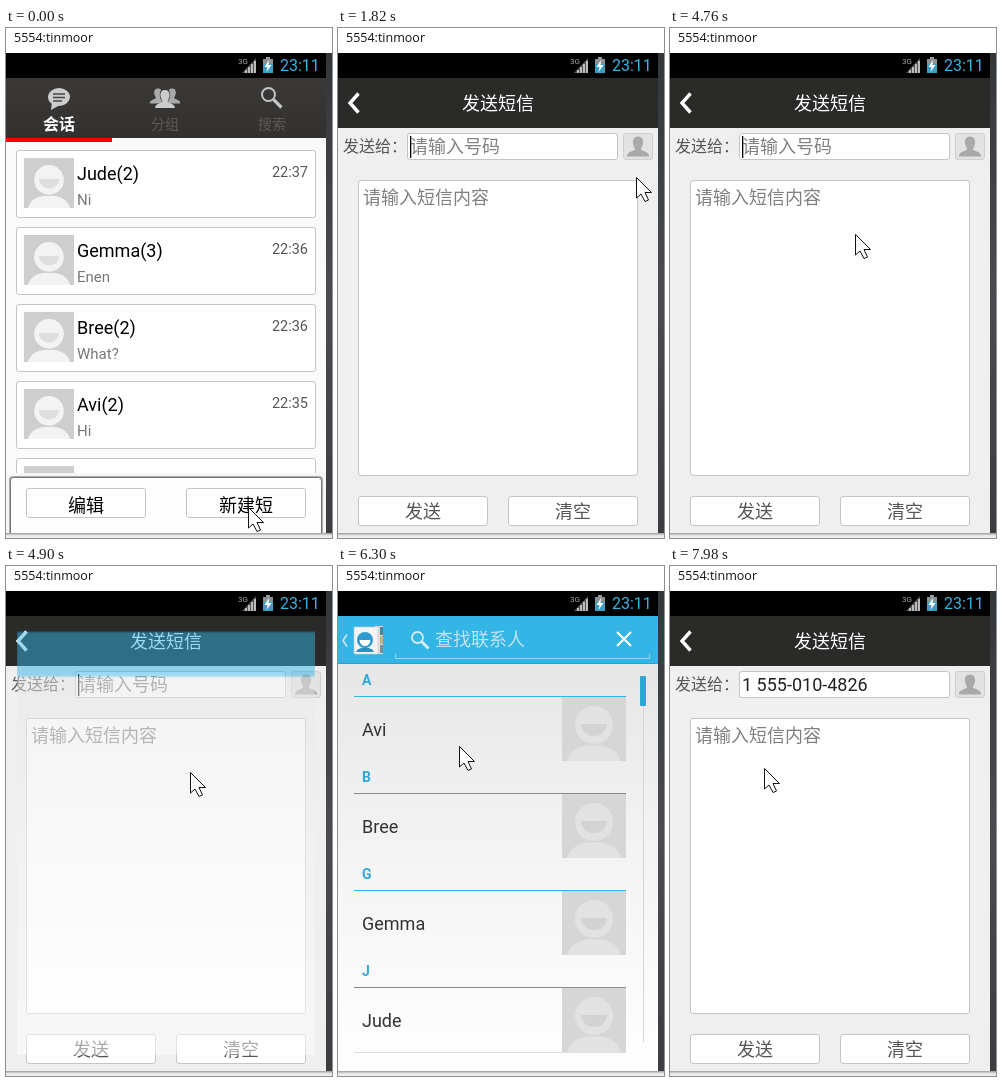
An HTML page for the animation above (8000 ms loop, 326 by 510 pixels).

```html
<!DOCTYPE html>
<html lang="zh-CN">
<head>
<meta charset="utf-8">
<title>短信</title>
<style>
html, body { margin: 0; width: 100%; height: 100%; overflow: hidden; background: #fff; }
svg { display: block; }
text { font-family: Roboto, "Noto Sans CJK SC", "Noto Sans CJK", sans-serif; white-space: pre; }
</style>
</head>
<body>
<svg id="stage" width="326" height="510" viewBox="0 0 326 510"></svg>
<script>
const STEP = 140, LOOP = 8000;

// Drawing helpers returning SVG markup
const rect = (x, y, w, h, fill, more = '') =>
  `<rect x="${x}" y="${y}" width="${w}" height="${h}" fill="${fill}" ${more}/>`;
const box = (x, y, w, h, fill = '#fff', stroke = '#c4c4c4') =>
  rect(x + .5, y + .5, w - 1, h - 1, fill, `rx="2.5" stroke="${stroke}"`);
const text = (s, x, y, size, fill, more = '') =>
  `<text x="${x}" y="${y}" font-size="${size}" fill="${fill}" ${more}>${s}</text>`;
const mid = 'text-anchor="middle"';
const path = (d, fill, more = '') => `<path d="${d}" fill="${fill}" ${more}/>`;
const line = (d, stroke, width = 1, more = '') =>
  path(d, 'none', `stroke="${stroke}" stroke-width="${width}" ${more}`);
const circle = (x, y, r, fill, more = '') =>
  `<circle cx="${x}" cy="${y}" r="${r}" fill="${fill}" ${more}/>`;
const group = (id, body, more = '') => `<g id="${id}" ${more}>${body}</g>`;

const avatar = (x, y, size, back, face, smile) =>
  `<g transform="translate(${x} ${y}) scale(${size / 64})">` +
  rect(0, 0, 64, 64, back) +
  path('M5 64C8 53 18 48 32 48S56 53 59 64Z', face) +
  circle(32, 28, 20.5, back) + circle(32, 28, 19, face) +
  path('M19 27H45C44 35 39 39 32 39S20 35 19 27Z', smile) + '</g>';

const magnifier = (x, y, r, color, width) =>
  circle(x, y, r, 'none', `stroke="${color}" stroke-width="${width}"`) +
  line(`M${x + r * .75} ${y + r * .75}L${x + r * 2} ${y + r * 2}`, color, width * 1.6);

const person = (x, y, k, color) =>
  `<g transform="translate(${x} ${y}) scale(${k})">` +
  path('M0-10C4-10 5.5-7 5-3C4.5 0 3 1 3 3C5 5 11 5 11 10H-11C-11 5-5 5-3 3C-3 1-4.5 0-5-3C-5.500-7-4-10 0-10Z', color) + '</g>';

function frameView() {
  return rect(0, 0, 326, 510, '#fff') +
    text('5554:tinmoor', 8, 13.500, 12.5, '#111', 'style="font-family:\'Open Sans\',sans-serif"') +
    rect(0, 505, 326, 5, 'url(#under)') +
    rect(320, 25, 6, 480, 'url(#side)') +
    rect(0, 25, 320, 480, '#000') +
    text('3G', 232, 36, 8, '#aaa') +
    path('M236 45L250 30V45Z', '#555') +
    [0, 1, 2, 3].map(i => rect(239 + i * 3, 42 - i * 3, 2, 3 + i * 3, '#bbb')).join('') +
    rect(260, 29, 4, 2, '#999') + rect(257, 31, 10, 14, '#8a9297') +
    rect(257, 36, 10, 9, '#3b9fc4') + path('M263 32L258.500 39H261.500L260.500 44L265.500 37H262.500Z', '#fff') +
    text('23:11', 274, 43, 16, '#33b5e5');
}

function listView() {
  const chats = [['Jude(2)', 'Ni', '22:37'], ['Gemma(3)', 'Enen', '22:36'],
    ['Bree(2)', 'What?', '22:36'], ['Avi(2)', 'Hi', '22:35'], ['', '', '']];
  const cards = chats.map(([name, note, time], i) => {
    const y = 122 + i * 77;
    return box(10, y, 300, 68) + avatar(18, y + 8, 50, '#cecece', '#f3f3f3', '#dedede') +
      text(name, 71, y + 30, 18, '#000') + text(note, 71, y + 55, 15, '#777') +
      text(time, 302, y + 27, 14.5, '#555', 'text-anchor="end"');
  }).join('');
  return rect(0, 50, 320, 455, '#fafafa') + cards +
    rect(0, 50, 320, 60, 'url(#tabs)') + rect(0, 110, 106, 4, '#f00') +
    `<ellipse cx="53" cy="69" rx="11" ry="9" fill="#ccc"/>` + path('M46 74L45 82L54 77Z', '#ccc') +
    line('M47 66H59M47 69.500H59M47 73H56', '#444', 1.3) +
    person(152, 68, .75, '#aaa') + person(166, 68, .75, '#aaa') +
    person(159, 71, 1.02, '#363433') + person(159, 71, .9, '#ccc') +
    magnifier(262.500, 66.500, 6.500, '#c4c4c4', 2) +
    text('会话', 53, 102, 16, '#fff', mid + ' font-weight="700"') +
    text('分组', 159, 101, 14, '#5c5a58', mid) + text('搜索', 266, 101, 14, '#5c5a58', mid) +
    rect(0, 445, 320, 60, '#f6f6f6') +
    rect(3, 448, 314, 60, '#aaa', 'rx="4"') + rect(4.500, 449.500, 311, 60, '#fdfdfd', 'rx="3" stroke="#777"') +
    box(20, 460, 120, 30) + box(180, 460, 120, 30) +
    text('编辑', 80, 484, 18, '#000', mid + ' font-weight="500"') +
    text('新建短', 240, 484, 18, '#000', mid + ' font-weight="500"');
}

function formView() {
  return rect(0, 50, 320, 455, '#efefef') + rect(0, 50, 320, 50, '#2a2b28') +
    line('M20.500 65.500L12 75L20.500 84.500', '#fff', 3.4) +
    text('发送短信', 160, 82, 18, '#fff', mid) +
    text('发送给：', 5, 124, 16, '#555') + box(69, 105, 211, 27) +
    group('hint', text('请输入号码', 72, 124.5, 18, '#808080')) +
    group('number', text('1 555-010-4826', 72, 124.5, 18, '#222')) +
    group('caret', rect(72, 108, 1.3, 22, '#000')) +
    box(285, 105, 30, 27, '#e2e2e2', '#cfcfcf') + person(300, 118.500, 1, '#a9a9a9') +
    box(20, 152, 280, 296) + text('请输入短信内容', 25, 176, 18, '#808080') +
    box(20, 468, 130, 30) + box(170, 468, 130, 30) +
    text('发送', 85, 490, 18, '#555', mid) + text('清空', 235, 490, 18, '#555', mid);
}

function contactsView() {
  const people = ['Avi', 'Bree', 'Gemma', 'Jude'];
  const rows = people.map((name, i) => {
    const y = 131 + i * 97;
    const head = text(name[0], 24, y - 12, 14, '#33a9d9', 'font-weight="700"') +
      rect(16, y - 1, 272, 1, i % 2 ? '#8a8a8a' : '#33b5e5');
    return (i ? head : group('firstHead', head)) +
      text(name, 24, y + 39, 18, '#333') + avatar(224, y, 64, '#d6d6d6', '#e2e2e2', '#d3d3d3');
  }).join('');
  const bar = line('M9 68.500L5 74.500L9 80.500', '#bfe3f2', 1.8) +
    rect(37, 60, 8, 28, '#ddd') + rect(42, 61, 3, 8, '#5a7f92') + rect(42, 70, 3, 8, '#c9b27c') +
    rect(42, 79, 3, 8, '#7c8f98') + rect(16, 61, 24, 27, '#f4f4f4', 'rx="1" stroke="#ccc" stroke-width=".6"') +
    path('M18 86C20 80 34 80 36 86Z', '#2d8fbd') + circle(27, 74, 8, '#2d9bce') +
    path('M21.500 74H32.500C32 78 30 80 27 80S22 78 21.500 74Z', '#fff') +
    magnifier(79.500, 71.500, 5.500, '#d5edf6', 1.8) +
    text('查找联系人', 97, 80, 18, '#c3e2ef') +
    line('M57.500 88V92.500H311.500V88', '#9ad5ea');
  return rect(0, 50, 320, 455, 'url(#paper)') + rect(0, 50, 320, 47, '#33b5e5') +
    rect(0, 97, 320, 1, '#2ba3d0') + group('bar', bar) +
    group('cross', line('M279 66L293 80M293 66L279 80', '#fff', 2)) +
    group('pressed', rect(16, 131, 208, 64, '#33b5e5', 'opacity=".45"')) +
    group('rows', rows + rect(16, 486, 272, 1, '#ddd') + rect(305, 110, 1, 366, '#d4d4d4')) +
    group('thumb', rect(302, 110, 6, 30, '#33a5d3', 'rx="1"'));
}

const gradient = (id, ...colors) =>
  `<linearGradient id="${id}" x2="0" y2="1">` + colors.map((c, i) =>
    `<stop offset="${i / (colors.length - 1)}" stop-color="${c}"/>`).join('') + '</linearGradient>';

stage.innerHTML = '<defs>' + gradient('under', '#999', '#e4e4e4', '#f4f4f4') +
  gradient('side', '#34373a', '#4a4c4f', '#3b3d40') + gradient('tabs', '#3b3937', '#33312f') +
  gradient('paper', '#e3e3e3', '#f3f3f3', '#fff') +
  '<clipPath id="screen"><rect y="50" width="320" height="455"/></clipPath></defs>' +
  frameView() + '<g clip-path="url(#screen)">' +
  group('list', listView()) + group('form', formView()) + group('contacts', contactsView()) + '</g>' +
  group('pointer', path('M.5.5V21L5 17L9 24.500L12.500 23L9 15.500H15.500Z', '#fff', 'stroke="#111"'));

const el = id => document.getElementById(id);
const fade = (id, a) => el(id).setAttribute('opacity', a);
const show = (id, on) => el(id).setAttribute('display', on ? 'inline' : 'none');

function layer(id, alpha, scale = 1) {
  show(id, alpha > 0);
  fade(id, alpha);
  el(id).setAttribute('transform', `translate(160 277) scale(${scale}) translate(-160 -277)`);
}

// Pointer stops: time, x, y
const stops = [[0, 242, 479], [700, 242, 479], [840, 241, 478], [1820, 298, 149], [2100, 299, 116],
  [2380, 299, 116], [2940, 232, 192], [4200, 232, 192], [4760, 185, 206], [5180, 183, 207],
  [5460, 183, 207], [6440, 111, 175], [7140, 111, 175], [7980, 94, 202], [LOOP, 94, 202]];

function pointerAt(t) {
  const i = stops.findIndex((s, n) => n && t <= s[0]);
  const [t0, x0, y0] = stops[i - 1], [t1, x1, y1] = stops[i];
  const k = (t - t0) / (t1 - t0);
  return [Math.round(x0 + (x1 - x0) * k), Math.round(y0 + (y1 - y0) * k)];
}

function draw(now) {
  const t = Math.floor(now % LOOP / STEP) * STEP;
  const picked = t >= 7280;

  layer('list', t < 840 ? 1 : t < 980 ? .5 : 0);
  if (t < 840) layer('form', 0);
  else if (t < 980) layer('form', .92, .986);
  else layer('form', 1);

  if (t < 4900 || t >= 7560) layer('contacts', 0);
  else if (t < 5040) layer('contacts', .5, .93);
  else if (t < 5180) layer('contacts', .92, .986);
  else if (t < 7280) layer('contacts', 1);
  else if (t < 7420) layer('contacts', .6, .95);
  else layer('contacts', .15, .87);

  const loaded = t < 5460 ? 0 : Math.min(1, .28 + (t - 5460) / 400);
  fade('rows', loaded);
  fade('firstHead', loaded < .3 ? 0 : 1);
  fade('bar', loaded && Math.min(1, loaded + .08));
  fade('cross', Math.sqrt(loaded));
  fade('thumb', Math.sqrt(loaded));
  show('pressed', t >= 6720 && t < 7000);

  show('hint', !picked);
  show('number', picked);
  show('caret', !picked && (t >= 3360 || t % 840 < 420));
  el('pointer').setAttribute('transform', `translate(${pointerAt(t)})`);
}

function tick() {
  draw(performance.now());
  requestAnimationFrame(tick);
}
tick();
</script>
</body>
</html>
```
